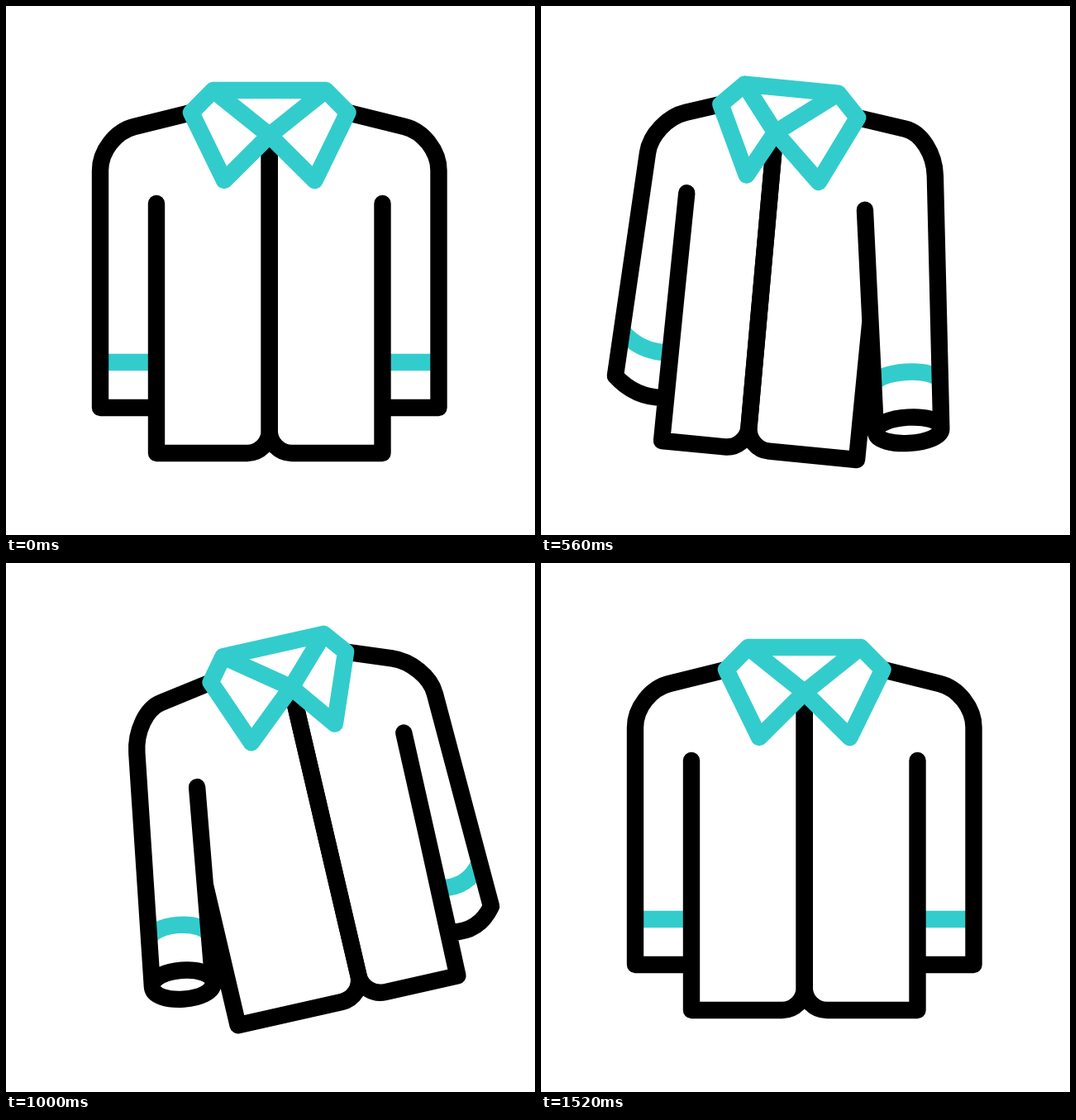
Write an HTML page with a canvas that moves like this. It is 640 px wide and 640 px high and loops after 2400 ms.

```html
<!DOCTYPE html>
<html lang="en">
<head>
<meta charset="utf-8">
<title>Swinging jacket</title>
<style>
  html, body { margin: 0; width: 100%; height: 100%; overflow: hidden; background: #fff; }
  canvas { display: block; width: 640px; height: 640px; }
</style>
</head>
<body>
<canvas id="stage" width="640" height="640"></canvas>
<script>
const ctx = document.getElementById('stage').getContext('2d');
const LOOP = 2400;
const BLACK = '#000', TEAL = '#33cccc';
const BAND_GAP = 55, HEM_RADIUS = 27;

// Left half at rest, measured from the collar's crossing; the right half mirrors it.
const half = {
  top: [-68, -54], edge: [-94.75, -27], tip: [-54.75, 55],
  shoulder: [-163.5, -10], bend: [-204.75, 43], armpit: [-136.75, 83],
  cuff: [-204.75, 330], inner: [-136.75, 330], hem: [-136.75, 385]
};

// How far each part slides when the jacket turns. A positive bulge shows the
// back of the cuff, a negative one its opening.
const turnLeft = {
  neck: -40, bottom: -37, squeeze: 0,
  left: { collar: -12.5, shoulder: [17, -3], armpit: [0, 0], cuff: [6.5, -18], inner: [1, 3], hem: 0, bulge: 9.5 },
  right: { collar: -35.5, shoulder: [-45, -10], armpit: [-60, 0], cuff: [-6, 9], inner: [-18, 21], hem: -39, bulge: -17.5 }
};
const turnRight = {
  neck: 27, bottom: 30, squeeze: -0.2,
  left: { collar: 9, shoulder: [32, -6], armpit: [26, 10], cuff: [-12, -13], inner: [-7, -2], hem: 11, bulge: -17.5 },
  right: { collar: 25, shoulder: [-10, 3], armpit: [11, 1], cuff: [0, -18], inner: [11, 1], hem: 10, bulge: 10 }
};

// Smooth step from 0 to 1; a skew below 1 starts faster and settles longer.
function ease(t, from, to, skew = 1) {
  const u = Math.min(1, Math.max(0, (t - from) / (to - from))) ** skew;
  return u * u * (3 - 2 * u);
}

const mix = (a, b, k) => [a[0] + (b[0] - a[0]) * k, a[1] + (b[1] - a[1]) * k];
const toward = (a, b, d) => mix(a, b, d / Math.hypot(b[0] - a[0], b[1] - a[1]));

function crossing(a, b, c, d) {
  const rx = b[0] - a[0], ry = b[1] - a[1], sx = d[0] - c[0], sy = d[1] - c[1];
  return mix(a, b, ((c[0] - a[0]) * sy - (c[1] - a[1]) * sx) / (rx * sy - ry * sx));
}

function poseSide(name, toLeft, toRight) {
  const mirror = name === 'left' ? 1 : -1;
  const a = turnLeft[name], b = turnRight[name];
  const blend = (p, q) => p * toLeft + q * toRight;
  const slide = (point, key) => [
    mirror * half[point][0] + blend(a[key][0], b[key][0]),
    half[point][1] + blend(a[key][1], b[key][1])
  ];
  const fold = point => {
    const x = mirror * half[point][0];
    return [x + blend(a.collar + turnLeft.squeeze * x, b.collar + turnRight.squeeze * x), half[point][1]];
  };
  return {
    top: fold('top'), edge: fold('edge'), tip: fold('tip'),
    shoulder: slide('shoulder', 'shoulder'), bend: slide('bend', 'shoulder'),
    armpit: slide('armpit', 'armpit'), cuff: slide('cuff', 'cuff'), inner: slide('inner', 'inner'),
    hem: [mirror * half.hem[0] + blend(a.hem, b.hem), half.hem[1]],
    bulge: blend(a.bulge, b.bulge)
  };
}

function stroke(color, build) {
  ctx.strokeStyle = color;
  ctx.beginPath();
  build();
  ctx.stroke();
}
const move = p => ctx.moveTo(...p);
const line = (...points) => points.forEach(p => ctx.lineTo(...p));

function roundCorner(from, corner, to) {
  line(from);
  ctx.bezierCurveTo(...mix(from, corner, 0.55), ...mix(to, corner, 0.55), ...to);
}

// Bow from a to b, bulging down; a small inset gives a half ellipse.
function bow(a, b, bulge, inset) {
  const dx = b[0] - a[0], dy = b[1] - a[1];
  const k = 4 / 3 * bulge * Math.sign(dx) / Math.hypot(dx, dy);
  const lift = p => [p[0] - dy * k, p[1] + dx * k];
  move(a);
  ctx.bezierCurveTo(...lift(mix(a, b, inset)), ...lift(mix(b, a, inset)), ...b);
}

const cuffInset = s => Math.max(0, 1 / 3 + Math.min(0, s.bulge) / 40);

function drawBand(s) {
  stroke(TEAL, () => bow(
    toward(s.cuff, s.bend, BAND_GAP), toward(s.inner, s.armpit, BAND_GAP), s.bulge, cuffInset(s)));
}

function drawSide(s, neck, bottom) {
  stroke(BLACK, () => {
    move(s.edge);
    roundCorner(s.shoulder, crossing(s.edge, s.shoulder, s.cuff, s.bend), s.bend);
    line(s.cuff);
    bow(s.cuff, s.inner, s.bulge, cuffInset(s));
    bow(s.cuff, s.inner, Math.abs(s.bulge), cuffInset(s));
    move(s.armpit);
    line(s.inner);
    move(mix(s.armpit, s.inner, 0.5));
    line(s.hem);
    roundCorner(toward(bottom, s.hem, HEM_RADIUS), bottom, toward(bottom, neck, HEM_RADIUS));
    line(neck);
  });
}

function drawCollar(l, r, neck) {
  stroke(TEAL, () => {
    move(neck);
    line(l.tip, l.edge, l.top, r.top, r.edge, r.tip, neck, l.top);
    move(neck);
    line(r.top);
  });
}

function draw(t) {
  const first = ease(t, 0, 476), second = ease(t, 476, 1009);
  const toLeft = first - second;
  const toRight = second - ease(t, 1009, 1520, 0.7);
  const swingBack = second - ease(t, 1009, 1440, 0.7);
  const tilt = 6.9 * toLeft - 12.7 * swingBack;

  const left = poseSide('left', toLeft, toRight);
  const right = poseSide('right', toLeft, toRight);
  const neck = [turnLeft.neck * toLeft + turnRight.neck * toRight, 0.5];
  const bottom = [turnLeft.bottom * toLeft + turnRight.bottom * toRight, half.hem[1]];

  ctx.fillStyle = '#fff';
  ctx.fillRect(0, 0, 640, 640);
  ctx.save();
  ctx.translate(318.75, 156);
  ctx.rotate(tilt * Math.PI / 180);
  ctx.lineWidth = 20.4;
  ctx.lineJoin = 'round';
  ctx.lineCap = 'butt';
  drawBand(left);
  drawBand(right);
  ctx.lineCap = 'round';
  drawSide(left, neck, bottom);
  drawSide(right, neck, bottom);
  drawCollar(left, right, neck);
  ctx.restore();
}

const start = performance.now();
function tick() {
  draw((performance.now() - start) % LOOP);
  requestAnimationFrame(tick);
}
tick();
</script>
</body>
</html>
```
